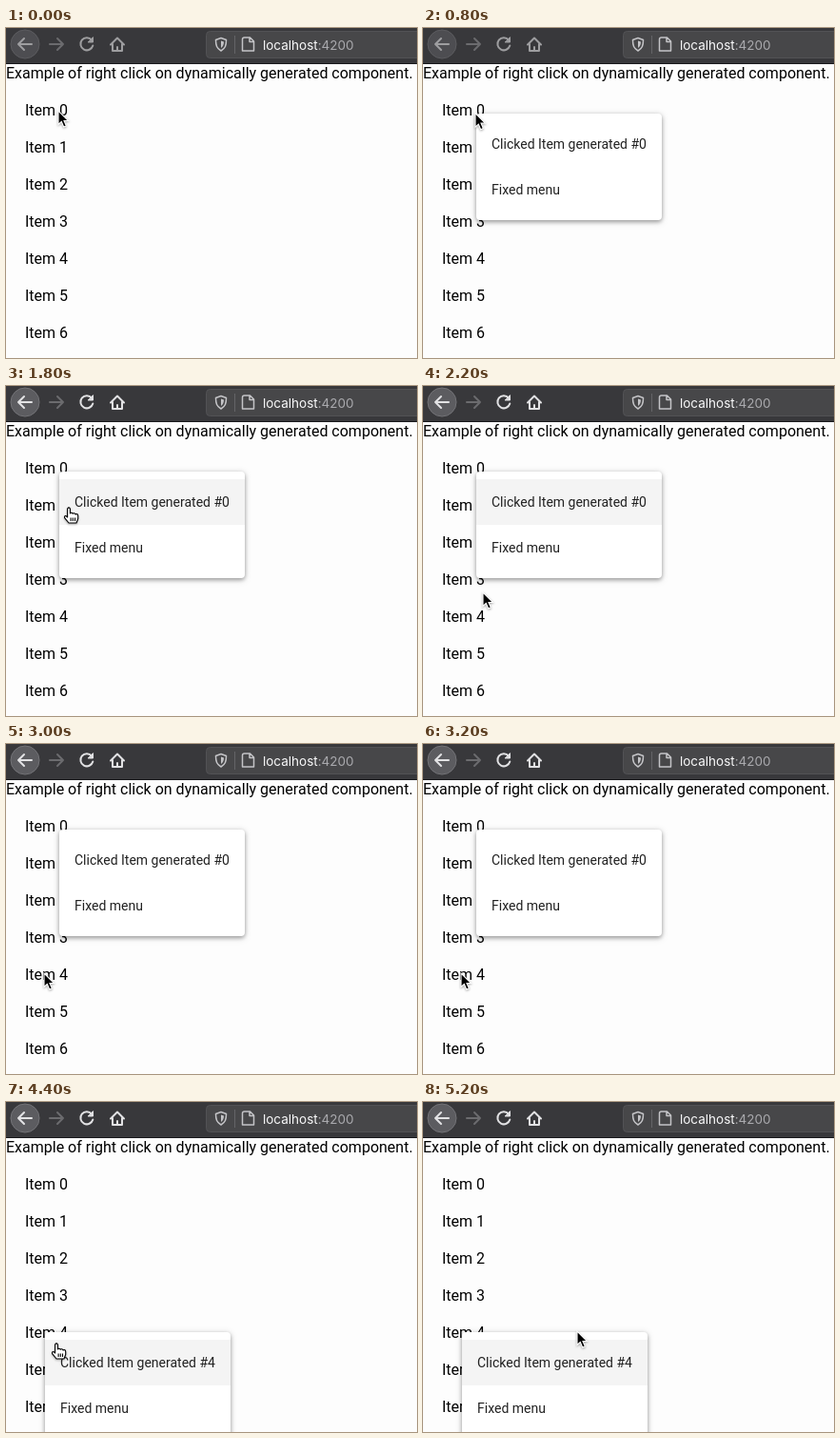
These frames come from a looping animation (432 by 347 pixels, 5.4 s). An HTML page:

```html
<!DOCTYPE html>
<html lang="en">
<head>
<meta charset="utf-8">
<title>Context menu demo</title>
<style>
html, body { margin: 0; width: 100%; height: 100%; overflow: hidden; background: #fdfdfd; }
svg { display: block; width: 432px; height: 347px; }
text { font: 16px Roboto, sans-serif; fill: #000; white-space: pre; }
#menu text { font-size: 14px; fill: #212121; }
#panel {
  filter: drop-shadow(0 2px 2px #0004) drop-shadow(0 1px 3px #0003);
}
.icon { fill: none; stroke: #e2e2e4; stroke-width: 2; stroke-linecap: round; stroke-linejoin: round; }
#url { font: 13.5px Inter, sans-serif; fill: #f9f9fa; }
#arrow, #hand { filter: drop-shadow(0 1px 1px #0005); }
</style>
</head>
<body>
<svg viewBox="0 0 432 347">
  <rect width="432" height="347" fill="#fdfdfd"/>
  <rect width="432" height="38" fill="#38383b"/>
  <rect y="37" width="432" height="1" fill="#19191b"/>
  <rect x="210.5" y="3.5" width="240" height="28" rx="4" fill="#474749" stroke="#525255"/>

  <g id="nav">
    <circle cx="20" cy="17" r="15" fill="#5c5c60" stroke="#737377"/>
    <g class="icon">
      <path d="M27 17H13M19 11l-6 6 6 6"/>
      <path d="M90 12.5a6.6 6.6 0 1 0 1.3 6"/>
      <path d="M91.5 10v5h-5z" fill="#e2e2e4" stroke-width="1"/>
      <path d="M110 17.5l7-7 7 7M112 17v7h10v-7M117 24v-4"/>
    </g>
  </g>
  <path class="icon" d="M46 17H60M54 11l6 6-6 6" opacity=".3"/>
  <g class="icon" style="stroke:#c4c4c7;stroke-width:1.5">
    <path d="M226 10.5l5.5 2c0 6-1 9-5.5 11.5-4.500-2.500-5.500-5.500-5.500-11.500z"/>
    <path d="M226 13.500l3 1c0 3-.8 5-3 6.500z" fill="#c4c4c7" stroke="none"/>
    <path d="M250.500 10h6l4 4v10h-12v-12q0-2 2-2zM256 10v4.500h4.500"/>
  </g>
  <path d="M240.500 8V27" stroke="#646467"/>
  <text id="url" x="270" y="22.500">localhost<tspan fill="#a9a9ad">:4200</tspan></text>

  <text x="0" y="53">Example of right click on dynamically generated component.</text>
  <g id="items"></g>

  <g id="menu">
    <rect id="panel" width="195" height="112" rx="4" fill="#fff"/>
    <rect id="hover" y="8" width="195" height="48" fill="#f4f4f4"/>
    <text id="label" x="16" y="37"></text>
    <text x="16" y="85">Fixed menu</text>
  </g>

  <g id="cursor">
    <path id="arrow" d="M0 0V14.500L3.300 11.500 5.700 17 8.300 15.900 6 10.500H10.500Z"
      fill="#000" stroke="#fff" stroke-width="1.100"/>
    <path id="hand" d="M-1.400 1Q0-1.200 1.400 1V6Q2.800 4.300 4.200 6.200 5.800 4.900 7 6.900 9.400 5.900 9.700 8.500V11.500L8 16H0L-4.400 10.600Q-5 8-2.600 8.800L-1.400 10ZM2.100 10.500V14M4.300 10.500V14M6.500 10.500V14"
      fill="#fff" stroke="#000" stroke-width="1.100" stroke-linejoin="round"/>
  </g>
</svg>
<script>
const LOOP = 5400, STEP = 200;
const $ = id => document.getElementById(id);
const clamp = v => Math.max(0, Math.min(1, v));
const show = (el, on) => el.setAttribute("visibility", on ? "visible" : "hidden");

// Pointer stops: time, x, y
const path = [
  [0, 55, 87], [400, 55, 89], [1000, 55, 90], [1400, 40, 98],
  [1600, 62, 118], [1800, 66, 128], [2000, 64, 175], [2200, 63, 217],
  [2400, 62, 219], [2800, 40, 241], [4000, 40, 241], [4400, 53, 254],
  [4700, 60, 256], [5000, 168, 254], [5200, 162, 241]
];

// One entry per opened menu; hover is the highlighted time span
const menus = [
  { n: 0, x: 56, y: 90, open: 700, close: 3300, hover: [1600, 2700] },
  { n: 4, x: 41, y: 242, open: 4000, close: LOOP, hover: [4200, LOOP] }
];

$("items").innerHTML = Array.from({ length: 7 }, (_, i) =>
  `<text x="20" y="${92 + 39 * i}">Item ${i}</text>`).join("");

function pointer(t) {
  const i = path.findIndex(p => p[0] > t);
  if (i < 0) return path.at(-1).slice(1);
  const [a, b] = [path[i - 1], path[i]];
  const k = (t - a[0]) / (b[0] - a[0]);
  return [1, 2].map(j => a[j] + (b[j] - a[j]) * k);
}

function draw(t) {
  const [x, y] = pointer(t);
  const menu = menus.find(m => t >= m.open && t < m.close);
  let over = false;
  $("menu").setAttribute("display", menu ? "inline" : "none");
  if (menu) {
    const k = clamp((t - menu.open + 60) / 120);
    $("menu").setAttribute("transform", `translate(${menu.x} ${menu.y}) scale(${0.8 + 0.2 * k})`);
    $("menu").setAttribute("opacity", k);
    $("label").textContent = "Clicked Item generated #" + menu.n;
    show($("hover"), t >= menu.hover[0] && t < menu.hover[1]);
    over = x > menu.x && x < menu.x + 195 && y > menu.y + 8 && y < menu.y + 104;
  }
  $("cursor").setAttribute("transform", `translate(${x} ${y})`);
  show($("arrow"), !over);
  show($("hand"), over);
  $("nav").setAttribute("opacity", 0.6 + 0.4 * clamp((t - 1400) / 400));
}

function tick() {
  draw(Math.floor(performance.now() % LOOP / STEP) * STEP);
  requestAnimationFrame(tick);
}
tick();
</script>
</body>
</html>
```
